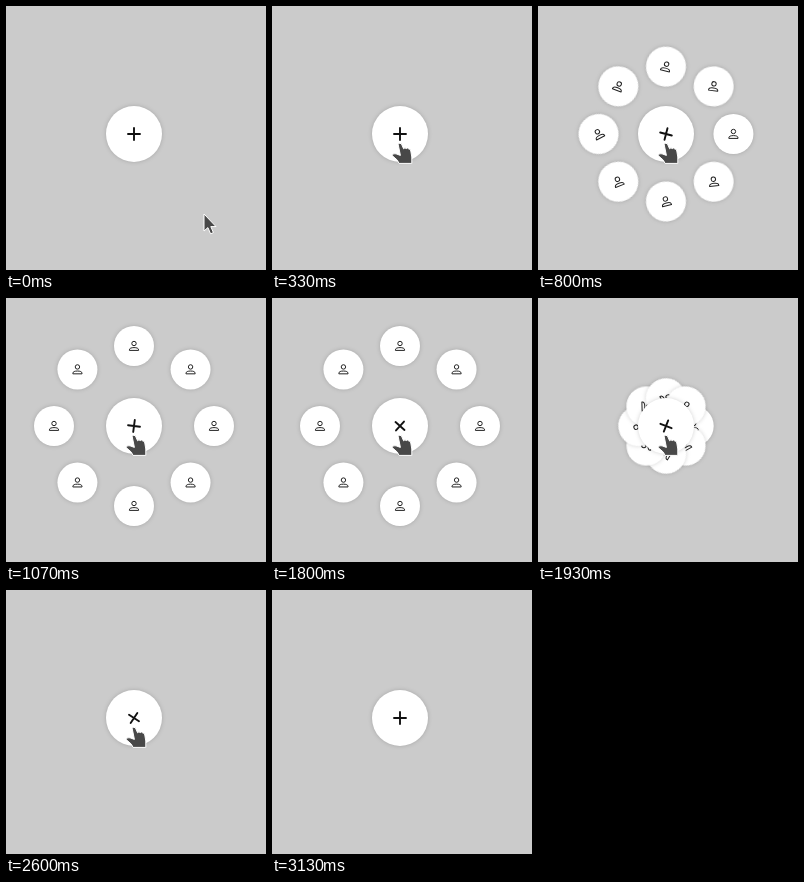
These frames come from a looping animation (260x264 px, 3540 ms). An HTML page:

```html
<!DOCTYPE html>
<html lang="en">
<head>
<meta charset="utf-8">
<title>Radial menu</title>
<style>
  html, body { margin: 0; width: 100%; height: 100%; overflow: hidden; background: #cbcbcb; }
  svg { display: block; width: 260px; height: 264px; }
  .disc { fill: #fff; filter: drop-shadow(0 0 2px rgba(0, 0, 0, .18)); }
  .icon { fill: none; stroke: #222; stroke-width: 1; stroke-linejoin: round; }
  .plus { stroke: #111; stroke-width: 1.9; stroke-linecap: round; }
  .pointer { fill: #484848; stroke: #fff; stroke-width: 1; stroke-linejoin: round; }
</style>
</head>
<body>
<svg viewBox="0 0 260 264">
  <defs>
    <g id="person" class="icon">
      <circle cy="-2.5" r="2.2"/>
      <path d="M-4.6 4.4V3.9C-4.6 2.2 -2.6 1.6 0 1.6S4.6 2.2 4.6 3.9V4.4Z"/>
    </g>
  </defs>
  <g id="items"></g>
  <circle class="disc" cx="128" cy="128" r="28"/>
  <path id="plus" class="plus" d="M-6 0H6M0 -6V6"/>
  <g id="cursor" class="pointer">
    <path id="arrow" d="M0 0V17L3.9 13.6L6.6 19.8L9.4 18.6L6.8 12.6H12Z"/>
    <path id="hand" d="M-1.8 1.6Q-.6 -.8 1.4 .8L3.6 5.8Q5 4 6.2 5.6Q7.8 4.2 8.8 6Q10.6 5.6 10.8 8L11.8 14V20.4H-1L-2.6 17.2L-7.8 12.6Q-7.4 9.8 -4 10.8L.4 12.4Z"/>
  </g>
</svg>
<script>
const LOOP = 3540, FPS = 15;
const CENTER = 128, RADIUS = 80;
const OPEN_AT = 600, CLOSE_AT = 1789;
const ITEM_TIME = 340, ITEM_DELAY = 15, PLUS_TIME = 1100, PLUS_TURN = 765;

const byId = id => document.getElementById(id);
const clamp = x => Math.min(1, Math.max(0, x));
const mix = (a, b, k) => a + (b - a) * k;
const bezier = (a, b, s) => 3 * (1 - s) ** 2 * s * a + 3 * (1 - s) * s * s * b + s ** 3;

// CSS "ease": cubic-bezier(.25, .1, .25, 1)
function ease(x) {
  x = clamp(x);
  if (x === 0 || x === 1) return x;
  let low = 0, high = 1;
  for (let i = 0; i < 24; i++) {
    const mid = (low + high) / 2;
    if (bezier(.25, .25, mid) < x) low = mid; else high = mid;
  }
  return bezier(.1, 1, low);
}

const items = [0, 45, 90, 135, 180, -135, -90, -45].map(angle => {
  const node = document.createElementNS('http://www.w3.org/2000/svg', 'g');
  node.innerHTML = '<circle class="disc" r="20"/><use href="#person"/>';
  byId('items').append(node);
  return { node, angle };
});

// Pointer hotspot: [time, x, y]
const path = [
  [0, 198, 208], [67, 186, 196], [133, 156, 166], [200, 128, 141],
  [267, 122, 137], [333, 128, 137], [2600, 128, 137],
  [2733, 118, 147], [2867, 117, 166], [3000, 119, 194], [3067, 120, 207]
];

function pointerAt(t) {
  const next = path.findIndex(p => p[0] >= t);
  if (next < 0) return path[path.length - 1].slice(1);
  if (next === 0) return path[0].slice(1);
  const [t0, x0, y0] = path[next - 1], [t1, x1, y1] = path[next];
  const k = (t - t0) / (t1 - t0);
  return [mix(x0, x1, k), mix(y0, y1, k)];
}

function openness(t, duration) {
  return t < CLOSE_AT
    ? ease((t - OPEN_AT) / duration)
    : 1 - ease((t - CLOSE_AT) / duration);
}

function draw(t) {
  const open = openness(t - ITEM_DELAY, ITEM_TIME);
  for (const { node, angle } of items) {
    const a = angle * Math.PI / 180, r = RADIUS * open;
    const x = CENTER + r * Math.cos(a), y = CENTER + r * Math.sin(a);
    node.setAttribute('transform', `translate(${x} ${y}) rotate(${-angle * (1 - open)})`);
    node.style.display = open > 0 ? '' : 'none';
  }

  const turn = PLUS_TURN * openness(t, PLUS_TIME);
  byId('plus').setAttribute('transform', `translate(${CENTER} ${CENTER}) rotate(${turn})`);

  const [x, y] = pointerAt(t);
  const hovering = Math.hypot(x - CENTER, y - CENTER) < 28;
  byId('cursor').setAttribute('transform', `translate(${x} ${y})`);
  byId('cursor').style.display = t > 3100 ? 'none' : '';
  byId('hand').style.display = hovering ? '' : 'none';
  byId('arrow').style.display = hovering ? 'none' : '';
}

function tick() {
  const t = performance.now() % LOOP;
  // The picture advances in steps of 1/15 s
  draw(Math.floor(t * FPS / 1000 + .06) * 1000 / FPS);
  requestAnimationFrame(tick);
}
tick();
</script>
</body>
</html>
```
